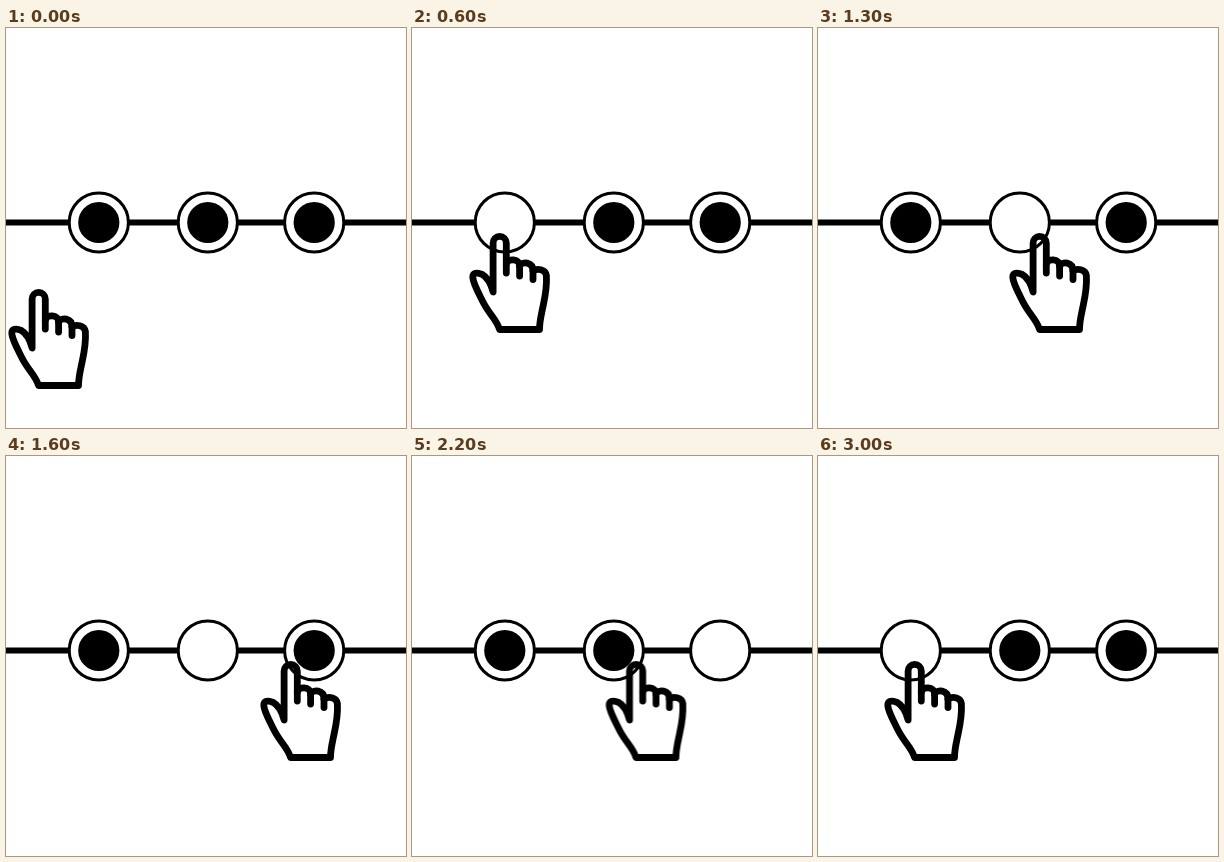
An HTML page that plays this animation: 400x400 px, repeating every 3.1 s.

```html
<!DOCTYPE html>
<html lang="en">
<head>
<meta charset="utf-8">
<title>Hand and switches</title>
<style>
  html, body { margin: 0; width: 100%; height: 100%; overflow: hidden; background: #fff; }
  svg { display: block; width: 100%; height: 100%; }
  .rings { fill: #fff; stroke: #000; stroke-width: 3; }
  .hand { fill: none; stroke: #000; stroke-width: 6.8; stroke-linecap: round; stroke-linejoin: round; }

  .hand, .dot { animation: 3100ms -1ms infinite; }
  .hand { animation-name: travel; animation-timing-function: steps(5, end); }
  .dot { animation-timing-function: step-end; }
  .left { animation-name: left; }
  .middle { animation-name: middle; }
  .right { animation-name: right; }

  /* five steps to each switch, then one beat for the press */
  @keyframes travel {
    0% { transform: translate(0, 0); }
    16.129%, 19.3548% { transform: translate(55px, -56px); }
    35.4839%, 38.7097% { transform: translate(168px, -56px); }
    54.8387%, 58.0645% { transform: translate(273px, -56px); }
    74.1935%, 77.4194% { transform: translate(171px, -56px); }
    93.5484%, 100% { transform: translate(64px, -56px); }
  }
  @keyframes left {
    0%, 38.7097% { opacity: 1; }
    19.3548%, 96.7742%, 100% { opacity: 0; }
  }
  @keyframes middle {
    0%, 58.0645%, 96.7742%, 100% { opacity: 1; }
    38.7097%, 77.4194% { opacity: 0; }
  }
  @keyframes right {
    0%, 77.4194%, 100% { opacity: 1; }
    58.0645% { opacity: 0; }
  }
</style>
</head>
<body>
<svg viewBox="0 0 400 400">
  <path d="M0 194.5H400" stroke="#000" stroke-width="6"/>
  <g class="rings">
    <circle cx="92.8" cy="194.5" r="29.6"/>
    <circle cx="201.8" cy="194.5" r="29.6"/>
    <circle cx="308.2" cy="194.5" r="29.6"/>
  </g>
  <circle class="dot left" cx="92.8" cy="194.5" r="20.6"/>
  <circle class="dot middle" cx="201.8" cy="194.5" r="20.6"/>
  <circle class="dot right" cx="308.2" cy="194.5" r="20.6"/>
  <g class="hand">
    <path d="M39.3 301V271A6.6 6.6 0 0 0 26.1 271V320C24 312 20 305 15 302.300C10 300 5.600 301 5.800 305.500C6 311 11 320 16 330C22 342 30 348 32.500 357.500H72.500C72.500 349 74.500 342 76.300 333C78.500 323 80 314 79.400 303.500C78.500 297 70 296 66 299"/>
    <path d="M39.3 292C40.500 286.500 52.600 286 52.600 294V304"/>
    <path d="M52.600 294C55 289 66 289.500 66 299V307.500"/>
  </g>
</svg>
</body>
</html>
```
